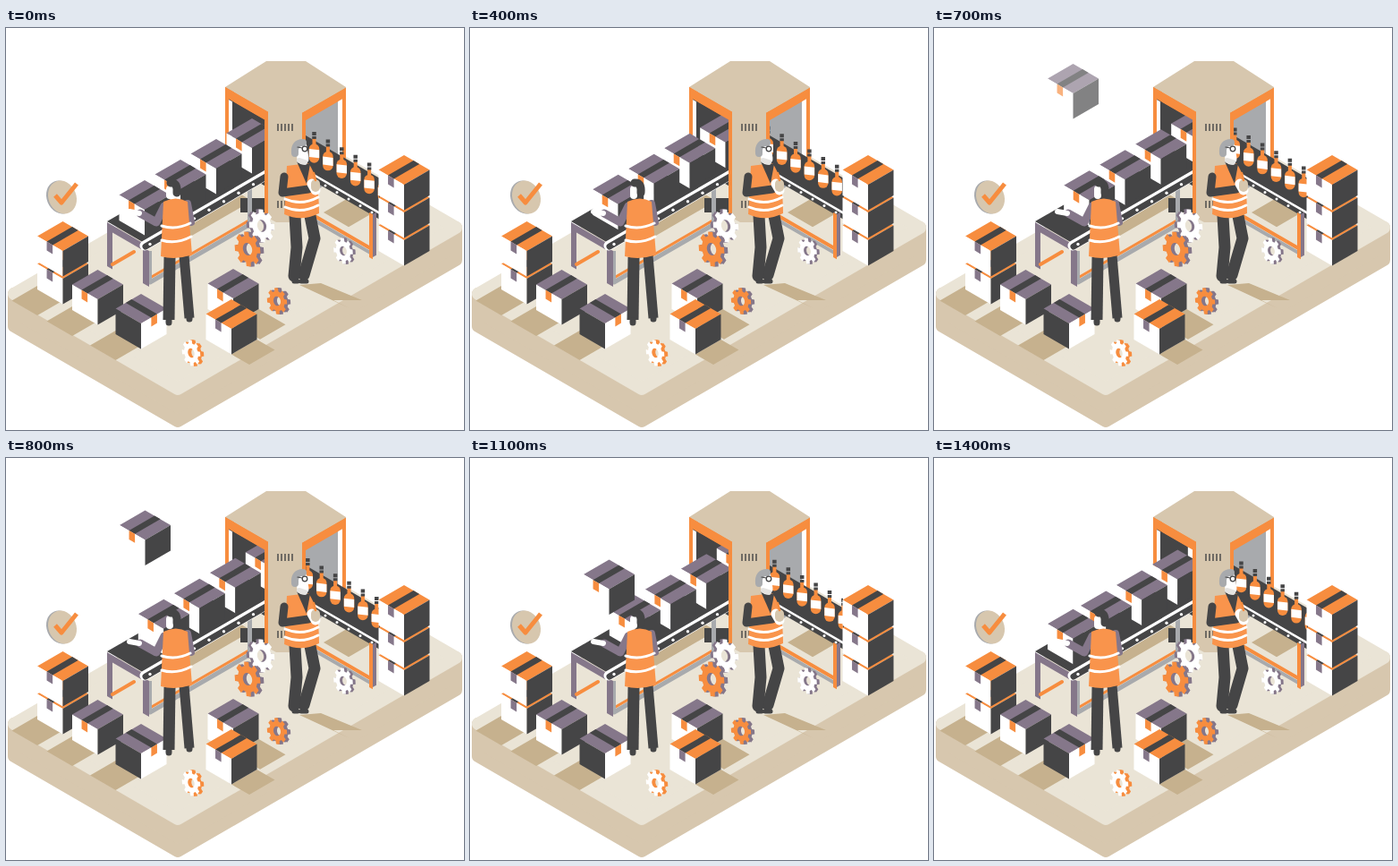
Write an HTML page that moves like this. It is 512 px wide and 449 px high and loops after 1.5 s.

```html
<!DOCTYPE html>
<html lang="en">
<head>
<meta charset="utf-8">
<title>Packing line</title>
<style>
html, body { margin: 0; width: 100%; height: 100%; overflow: hidden; background: #fff; }
svg { display: block; width: 100vw; height: 100vh; }
</style>
</head>
<body>
<svg id="stage" viewBox="0 0 512 449" xmlns="http://www.w3.org/2000/svg"></svg>
<script>
const ORANGE = '#f78d3f', VEST = '#f9944c', DARK = '#454546', PURPLE = '#85778a', TAN = '#d7c7ae',
      FLOOR = '#eae4d6', SHADE = '#c6b18e', GREY = '#a8aaad', WHITE = '#fff';
const SLOPE = .579;   // rise per pixel along an isometric axis
const SIDE = 28.5;    // carton edge, measured in x

const times = (n, make) => Array.from({ length: n }, (_, i) => make(i)).join('');
const path = (d, fill) => `<path d="${d}" fill="${fill}"/>`;
const line = (d, color, width, cap = 'round') =>
  `<path d="${d}" fill="none" stroke="${color}" stroke-width="${width}" stroke-linecap="${cap}" stroke-linejoin="round"/>`;
const dot = (x, y, r, fill) => `<circle cx="${x}" cy="${y}" r="${r}" fill="${fill}"/>`;
const rounded = (body, color, width) =>
  `<g stroke="${color}" stroke-width="${width}" stroke-linejoin="round">${body}</g>`;

// Flat parallelogram: from its left corner, up-right by r and down-right by d
const tile = (x, y, r, d, fill) =>
  path(`M${x} ${y}l${r} ${-SLOPE * r}l${d} ${SLOPE * d}l${-r} ${SLOPE * r}z`, fill);
// Upright panel; dir 1 falls to the right, -1 rises, 0 is level
const wall = (x, y, w, h, dir, fill) =>
  path(`M${x} ${y}l${w} ${SLOPE * w * dir}v${h}l${-w} ${-SLOPE * w * dir}z`, fill);
// Straight bar along an axis
const bar = (x, y, w, dir, color, width, cap) =>
  line(`M${x} ${y}l${w} ${SLOPE * w * dir}`, color, width, cap);

// (x, y) is the rear corner of the lid
function carton(x, y, lid = PURPLE, tape = ORANGE, h = SIDE) {
  const left = x - SIDE, mid = y + SIDE * SLOPE, from = SIDE * .37, band = SIDE * .23;
  return tile(left, mid, SIDE, SIDE, lid) +
    wall(left, mid, SIDE, h, 1, WHITE) +
    wall(x, mid + SIDE * SLOPE, SIDE, h, -1, DARK) +
    tile(left + from, mid + from * SLOPE, SIDE, band, DARK) +
    wall(left + from, mid + from * SLOPE, band, 10, 1, tape);
}
const mirror = (x, body) => `<g transform="translate(${2 * x} 0) scale(-1 1)">${body}</g>`;
const pile = (x, y, n) =>
  times(n, i => carton(x, y + (n - 1 - i) * 31, ORANGE, PURPLE));

function shadows() {
  const leftOf = (x, y) => tile(x - 2 * SIDE, y + 2 * SIDE * SLOPE + SIDE - 4, SIDE, SIDE, SHADE);
  const rightOf = (x, y, d) => tile(x, y + 2 * SIDE * SLOPE + SIDE, SIDE, d, SHADE);
  return leftOf(63.5, 247) + leftOf(102.5, 270) + leftOf(151, 297) +
    rightOf(254, 269, 30) + rightOf(252, 303, 20) +
    tile(185, 222, 70, 20, SHADE) + tile(355, 206, 28, 28, SHADE) +
    path('M328 287L352 285L398 304H366L384 313Z', SHADE);
}

function floor() {
  const w = 311, d = 183, h = 36;
  const slab = path(`M9 297v${h}l${d} ${d * SLOPE}l${w} ${-w * SLOPE}v${-h}z`, TAN);
  return rounded(slab, TAN, 14) + rounded(tile(9, 297, w, d, FLOOR), FLOOR, 14) + shadows();
}

function machineBack() {
  return path('M245 66L291 37H335L380 66V150H245Z', TAN) +
    wall(245, 66, 48, 64, 1, ORANGE) +
    wall(249, 79, 42, 74, 1, DARK) +
    wall(249, 80, 4, 46, 1, WHITE) +
    wall(331, 95, 49, 84, -1, ORANGE) +
    wall(335, 103, 41, 85, -1, GREY) +
    wall(371, 82, 5, 66, -1, WHITE);
}

function leftLine() {
  return wall(262, 190, 28, 16, 0, DARK) +
    wall(113, 222, 6, 44, 1, PURPLE) +
    bar(119, 264, 24, -1, ORANGE, 4) +
    bar(161, 279, 112, -1, ORANGE, 3) +
    bar(161, 284, 114, -1, GREY, 5) +
    wall(270, 180, 5, 40, -1, GREY) +
    wall(153, 245, 7, 40, 1, PURPLE) +
    wall(160, 249, 3, 36, 0, GREY) +
    wall(113, 217, 38, 8, 1, PURPLE) +
    tile(113, 216, 178, 40, DARK) +
    bar(155, 243, 138, -1, WHITE, 11) +
    bar(156, 244, 138, -1, DARK, 7) +
    times(8, i => dot(161 + i * 16.5, 241.5 - i * 16.5 * SLOPE, 1.7, WHITE));
}

function rightLine() {
  return bar(345, 210, 64, 1, ORANGE, 4) +
    bar(345, 215, 65, 1, GREY, 4) +
    wall(335, 120, 83, 46, 1, DARK) +
    bar(337, 160, 80, 1, WHITE, 2.5) +
    times(5, i => dot(357 + i * 13, 176 + i * 13 * SLOPE, 1.5, WHITE)) +
    wall(406, 206, 4, 50, 1, ORANGE) +
    wall(410, 208, 4, 48, -1, PURPLE);
}

function machineFront() {
  return path('M293 94H331V212L322 217H302L293 212Z', TAN) +
    wall(245, 66, 48, 11, 1, ORANGE) +
    wall(289, 95, 4, 114, 1, ORANGE) +
    wall(331, 95, 49, 10, -1, ORANGE) +
    wall(331, 95, 4, 66, -1, ORANGE) +
    times(5, i => line(`M${304 + i * 4} 107v8m0 78v8`, DARK, 1.4, 'butt'));
}

function bottle(x, y) {
  return `<g transform="translate(${x} ${y})">` +
    line('M0 8V16', ORANGE, 4) + line('M0 19V29', ORANGE, 11.5) +
    wall(-5.7, 19, 11.4, 9, .2, WHITE) + line('M0 0V4M0 5V8', DARK, 4.5, 'butt') + '</g>';
}

function packer() {
  return line('M183 256L182 326', DARK, 13, 'butt') + line('M199 254L205 324', DARK, 11, 'butt') +
    line('M182 327V329M205 322V325', DARK, 7) +
    line('M177 199L168 217L150 207', PURPLE, 9) + line('M149 207L138 205', WHITE, 6) +
    line('M203 196L207 217', PURPLE, 8) +
    path('M176 194Q190 187 203 194L208 253Q190 260 173 255Z', VEST) +
    line('M174 221Q190 226 206 218M174 237Q190 242 207 233', WHITE, 3) +
    line('M183 180V187', WHITE, 8) +
    line('M184 173Q192 172 191 184', DARK, 9);
}

function inspector() {
  return line('M340 210L345 235L333 276', DARK, 13) + line('M323 210L325 245L322 277', DARK, 13) +
    line('M322 283H326M330 283H336', DARK, 5) +
    path('M314 154L338 151Q350 166 350 207Q330 217 311 208Z', VEST) +
    line('M312 191Q330 199 349 189M312 200Q330 208 349 198', WHITE, 3) +
    path('M325 149L340 152L336 174Z', DARK) +
    line('M311 166L309 184L338 180', DARK, 9) +
    line('M342 174L346 181', WHITE, 11) +
    line('M346 174V178', TAN, 10) + line('M344 162L346 170', ORANGE, 2.5) +
    line('M330 133L332 146', WHITE, 13) +
    line('M323 140Q322 128 332 128', GREY, 8) +
    line('M328 148L334 150', '#e4e3e1', 6) +
    `<circle cx="334" cy="135" r="2.8" fill="none" stroke="${DARK}" stroke-width="1.3"/>` +
    line('M326 133L331 134', DARK, 1.2);
}

function gear(x, y, rx, ry, face, dx, edge = PURPLE) {
  const n = 8, corners = [[-.32, .76], [-.22, 1], [.22, 1], [.32, .76]];
  const teeth = Array.from({ length: n }, (_, i) => corners.map(([off, r]) => {
    const a = (i + off) / n * 2 * Math.PI + .25;
    return `${(rx * r * Math.cos(a)).toFixed(1)} ${(ry * r * Math.sin(a)).toFixed(1)}`;
  })).flat().join('L');
  const hx = rx * .36, hy = ry * .36;
  const d = `M${teeth}ZM${-hx} 0a${hx} ${hy} 0 1 0 ${2 * hx} 0a${hx} ${hy} 0 1 0 ${-2 * hx} 0Z`;
  const layer = (shift, fill) =>
    `<path transform="translate(${x + shift} ${y}) rotate(-14)" d="${d}" fill="${fill}" fill-rule="evenodd"/>`;
  return times(3, i => layer(dx * (1 - i / 3), edge)) + layer(0, face);
}

function badge() {
  const disc = (x, fill) =>
    `<ellipse rx="15.5" ry="19" transform="translate(${x} 189) rotate(-22)" fill="${fill}"/>`;
  return disc(61, GREY) + disc(63, TAN) + line('M55 187L62 195L79 174', ORANGE, 5, 'butt');
}

// Travel of each line per loop, which is also the gap between its items
const LOOP = 1500, STEP = 100;
const BOX_GAP = [40, -23], BOTTLE_GAP = [15.4, 8.6];

const stage = document.getElementById('stage');
stage.innerHTML =
  '<clipPath id="gate"><path d="M0 0H290V449H0Z"/></clipPath>' +
  '<clipPath id="chute"><path d="M335 90H417V240H335Z"/></clipPath>' +
  floor() + machineBack() + leftLine() + rightLine() +
  `<g clip-path="url(#gate)"><g id="cartons">${
    times(4, i => carton(155 + BOX_GAP[0] * (3 - i), 170 + BOX_GAP[1] * (3 - i)))}</g></g>` +
  `<g clip-path="url(#chute)"><g id="bottles">${
    times(7, i => bottle(344.5 + BOTTLE_GAP[0] * (i - 1), 116 + BOTTLE_GAP[1] * (i - 1)))}</g></g>` +
  machineFront() + `<g id="drop">${carton(155.5, 0)}</g>` +
  pile(445, 142, 3) + pile(63.5, 216, 2) +
  carton(102.5, 270) + mirror(151, carton(151, 297)) +
  carton(254, 269) + carton(252, 303, ORANGE, PURPLE) +
  packer() + inspector() +
  gear(286, 221, 14, 19, WHITE, -3) +
  gear(270, 247, 14, 20, ORANGE, 4) +
  gear(303, 305, 11, 15, ORANGE, 4) +
  gear(377, 249, 10.5, 15, WHITE, 3) +
  gear(207, 363, 10, 15, WHITE, 4, ORANGE) +
  badge();

const [cartons, bottles, drop] = ['cartons', 'bottles', 'drop'].map(id => document.getElementById(id));
const move = (el, x, y) => el.setAttribute('transform', `translate(${x} ${y})`);

function draw(ms) {
  const t = Math.floor(ms % LOOP / STEP) * STEP, p = t / LOOP;
  move(cartons, ...BOX_GAP.map(v => v * p));
  move(bottles, ...BOTTLE_GAP.map(v => v * p));
  move(drop, 0, 40 + (t - 700) * .184);
  drop.setAttribute('opacity', Math.max(0, Math.min(1, (t - 500) / 300)));
}

let start;
function tick(now) {
  start ??= now;
  draw(now - start);
  requestAnimationFrame(tick);
}
draw(0);
requestAnimationFrame(tick);
</script>
</body>
</html>
```
